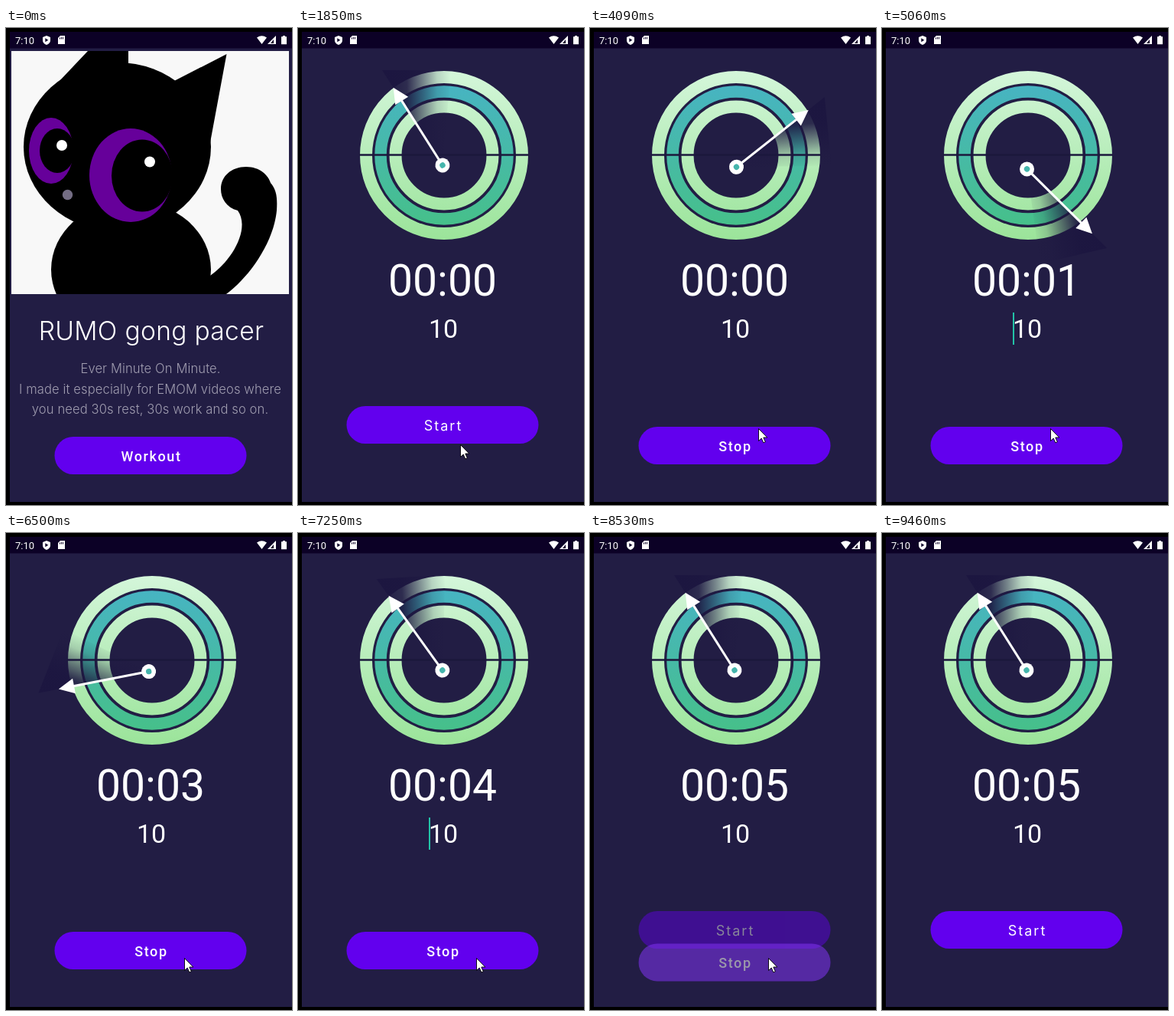
These frames come from a looping animation (374x622 px, 9920 ms). An HTML page:

```html
<!DOCTYPE html>
<html lang="en">
<head>
<meta charset="utf-8">
<title>Interval timer</title>
<style>
  html, body { margin: 0; width: 100%; height: 100%; overflow: hidden; background: #000; }
  svg { display: block; }
  text { fill: #fff; text-anchor: middle; font-family: Roboto, sans-serif; }
  .title { font: 300 33.6px Inter, sans-serif; letter-spacing: .3px; }
  .note { font: 300 16.6px Inter, sans-serif; letter-spacing: .1px; fill: #a09db0; }
  .label { font-size: 18px; font-weight: 500; letter-spacing: 1.6px; }
  .wide { font: 400 18px Inter, sans-serif; letter-spacing: 2px; }
  .pill { fill: #6200ee; }
  .ripple { fill: #fff; fill-opacity: .2; }
</style>
</head>
<body>
<svg width="374" height="622" viewBox="0 0 374 622">
  <defs>
    <linearGradient id="mint" gradientUnits="userSpaceOnUse" x1="0" y1="56" x2="0" y2="276">
      <stop offset="0" stop-color="#d4f6da"/><stop offset="1" stop-color="#9be49a"/>
    </linearGradient>
    <linearGradient id="teal" gradientUnits="userSpaceOnUse" x1="0" y1="75" x2="0" y2="257">
      <stop offset="0" stop-color="#47b4c2"/><stop offset="1" stop-color="#46c08a"/>
    </linearGradient>
    <linearGradient id="shade" gradientUnits="userSpaceOnUse" x1="110" y1="0" x2="200" y2="0">
      <stop offset="0" stop-color="#1c1640"/>
      <stop offset=".36" stop-color="#1c1640" stop-opacity=".9"/>
      <stop offset=".6" stop-color="#1c1640" stop-opacity=".5"/>
      <stop offset=".8" stop-color="#1c1640" stop-opacity=".15"/>
      <stop offset="1" stop-color="#1c1640" stop-opacity="0"/>
    </linearGradient>
    <clipPath id="photo"><rect x="7" y="30" width="363" height="317"/></clipPath>
    <clipPath id="pill"><rect x="63.5" width="251" height="49" rx="24.5"/></clipPath>
  </defs>

  <rect width="374" height="622"/>
  <rect x="5" y="5" width="369" height="613" fill="#221d44"/>
  <rect x="5" y="5" width="369" height="21.5" fill="#0c0126"/>

  <g id="status" fill="#fff">
    <text x="24.5" y="20.5" font-size="13">7:10</text>
    <path d="M53 10l5 2v4q0 4-5 6q-5-2-5-6v-4z"/>
    <path d="M51.3 13.2v5l4-2.5z" fill="#0c0126"/>
    <path d="M71 10h6v11h-9v-8z"/>
    <path d="M70.5 12.5v2M72.5 12v2.500M74.500 12v2.500" stroke="#0c0126"/>
    <path d="M328 12.500q6.500-4.500 13 0l-6.500 8.500z"/>
    <path d="M353 10v11h-11z"/>
    <path d="M350 15v5h-4z" fill="#0c0126"/>
    <path d="M362 10h3v1.200h2v10h-7v-10h2z"/>
  </g>

  <g id="home">
    <g clip-path="url(#photo)">
      <rect x="7" y="30" width="363" height="317" fill="#f8f8f8"/>
      <ellipse cx="163.500" cy="315" rx="104.500" ry="90"/>
      <ellipse cx="145.500" cy="155" rx="122.500" ry="110"/>
      <path d="M70 69L107 30V20H160V60L120 90zM220 69L288.500 34L265 160L200 120z"/>
      <path d="M267 323C295 304 320 262 303 238C288 234 281 222 281 210C281 193 295 181 314 181C332 181 343 192 346 202C354 211 355 222 354 238C350 280 318 325 288 347H230z"/>
      <g fill="#66009a">
        <ellipse cx="59" cy="160" rx="29" ry="43"/>
        <ellipse cx="163" cy="192" rx="54" ry="61"/>
      </g>
      <ellipse cx="67" cy="160" rx="23" ry="29"/>
      <ellipse cx="178" cy="192.500" rx="40" ry="47"/>
      <circle cx="73" cy="153" r="7" fill="#fff"/>
      <circle cx="188" cy="174.500" r="7" fill="#fff"/>
      <circle cx="80.500" cy="217.500" r="6.700" fill="#746d84"/>
    </g>
    <text class="title" x="190" y="407">RUMO gong pacer</text>
    <text class="note" x="189" y="450">Ever Minute On Minute.</text>
    <text class="note" x="188.500" y="476.500">I made it especially for EMOM videos where</text>
    <text class="note" x="188.500" y="503">you need 30s rest, 30s work and so on.</text>
  </g>

  <g id="timer">
    <g fill="none" stroke="url(#mint)">
      <circle cx="191" cy="166" r="102" stroke-width="16"/>
      <circle cx="191" cy="166" r="63.500" stroke-width="16"/>
      <circle cx="191" cy="166" r="83" stroke-width="15.500" stroke="url(#teal)"/>
    </g>
    <path d="M80 165.500H302" stroke="#1b183c" stroke-width="2.600"/>
    <g id="hand">
      <path d="M189 179L110 55H200z" fill="url(#shade)"/>
      <g transform="translate(189 179) rotate(-32.400)" fill="#fff">
        <path d="M0 0V-102" stroke="#fff" stroke-width="3"/>
        <path d="M0 -120L10 -99.500H-10z"/>
        <circle r="9.500"/>
        <circle r="3.700" fill="#45b5ac"/>
      </g>
    </g>
    <text id="clock" x="189" y="348.500" font-size="57"></text>
    <text x="190" y="404" font-size="34">10</text>
    <rect id="caret" x="171" y="371" width="2" height="42" fill="#22c3a6"/>
  </g>

  <g id="buttons"></g>

  <path id="cursor" d="M.5 .5V16.500L4.200 13L6.800 18.800L9.300 17.700L6.800 12H11.800z" fill="#fff" stroke="#000" stroke-width=".9"/>
</svg>

<script>
const LOOP = 9920, OPEN = 1250;
const SHOW = 3000, HIDE = 8300, FADE = 450;
const RUN = 3118, TURN = 0.0871;
const BLINK = 543.6;

// time, x, y of the pointer; it holds each place until the next
const moves = [
  [250, 304, 612], [320, 268, 589], [400, 240, 572], [460, 222, 562], [530, 212, 558],
  [1850, 212, 543], [1920, 214, 533], [2120, 215, 530], [2190, 216, 527],
  [2390, 217, 525], [2460, 219, 523], [2530, 220, 522],
  [5480, 225, 532], [5550, 230, 546], [5620, 233, 554],
  [8720, 250, 562], [8790, 278, 575], [8860, 312, 588], [8930, 342, 599], [8990, 362, 610],
  [9060, 400, 640]
];

const $ = id => document.getElementById(id);
const clamp = v => Math.min(1, Math.max(0, v));
const show = (el, on) => el.setAttribute('visibility', on ? 'visible' : 'hidden');

function makeButton(text, cls) {
  const g = document.createElementNS('http://www.w3.org/2000/svg', 'g');
  g.innerHTML = `<rect class="pill" x="63.5" width="251" height="49" rx="24.5"/>
    <g clip-path="url(#pill)"><circle class="ripple"/></g>
    <text class="label ${cls}" x="190" y="31.700">${text}</text>`;
  $('buttons').append(g);
  const ripple = g.querySelector('circle');
  return {
    place(y, alpha) {
      g.setAttribute('transform', `translate(0 ${y})`);
      g.setAttribute('opacity', alpha);
    },
    press(p, x, y) {
      ripple.setAttribute('cx', x);
      ripple.setAttribute('cy', y);
      ripple.setAttribute('r', 170 * p);
    }
  };
}

const workout = makeButton('Workout', '');
const start = makeButton('Start', 'wide');
const stop = makeButton('Stop', '');

function render(now) {
  const t = now % LOOP;
  const home = t < OPEN;
  const tick = t < 2860 ? t : 2860 + Math.floor((t - 2860) / 68) * 68;
  const running = tick >= RUN && tick < HIDE;

  show($('home'), home);
  show($('timer'), !home);
  show($('caret'), !home && Math.abs(Math.floor((t - 1850) / BLINK)) % 2 === 1);

  const angle = running ? (tick - RUN) * TURN : 0;
  $('hand').setAttribute('transform', `rotate(${angle} 189 181.500)`);

  const secs = Math.min(5, Math.max(0, Math.floor((t - RUN) / 1000)));
  $('clock').textContent = '00:0' + secs;

  const mix = clamp((tick - SHOW) / FADE) - clamp((tick - HIDE) / FADE);
  workout.place(533, home ? 1 : 0);
  start.place(493, home ? 0 : 1 - mix);
  stop.place(520 + 34 * (1 - mix), home ? 0 : mix);

  workout.press(clamp((t - 800) / 260), 212, 25);
  start.press(t < 3600 ? clamp((t - 2860) / 200) : 0, 220, 29);
  stop.press(t < 8900 ? clamp((t - 8180) / 200) : 0, 233, 34);

  const spot = moves.filter(m => m[0] <= t).pop() || [0, 400, 640];
  $('cursor').setAttribute('transform', `translate(${spot[1]} ${spot[2]})`);
}

const begin = performance.now();
function frame() {
  render(performance.now() - begin);
  requestAnimationFrame(frame);
}
frame();
</script>
</body>
</html>
```
